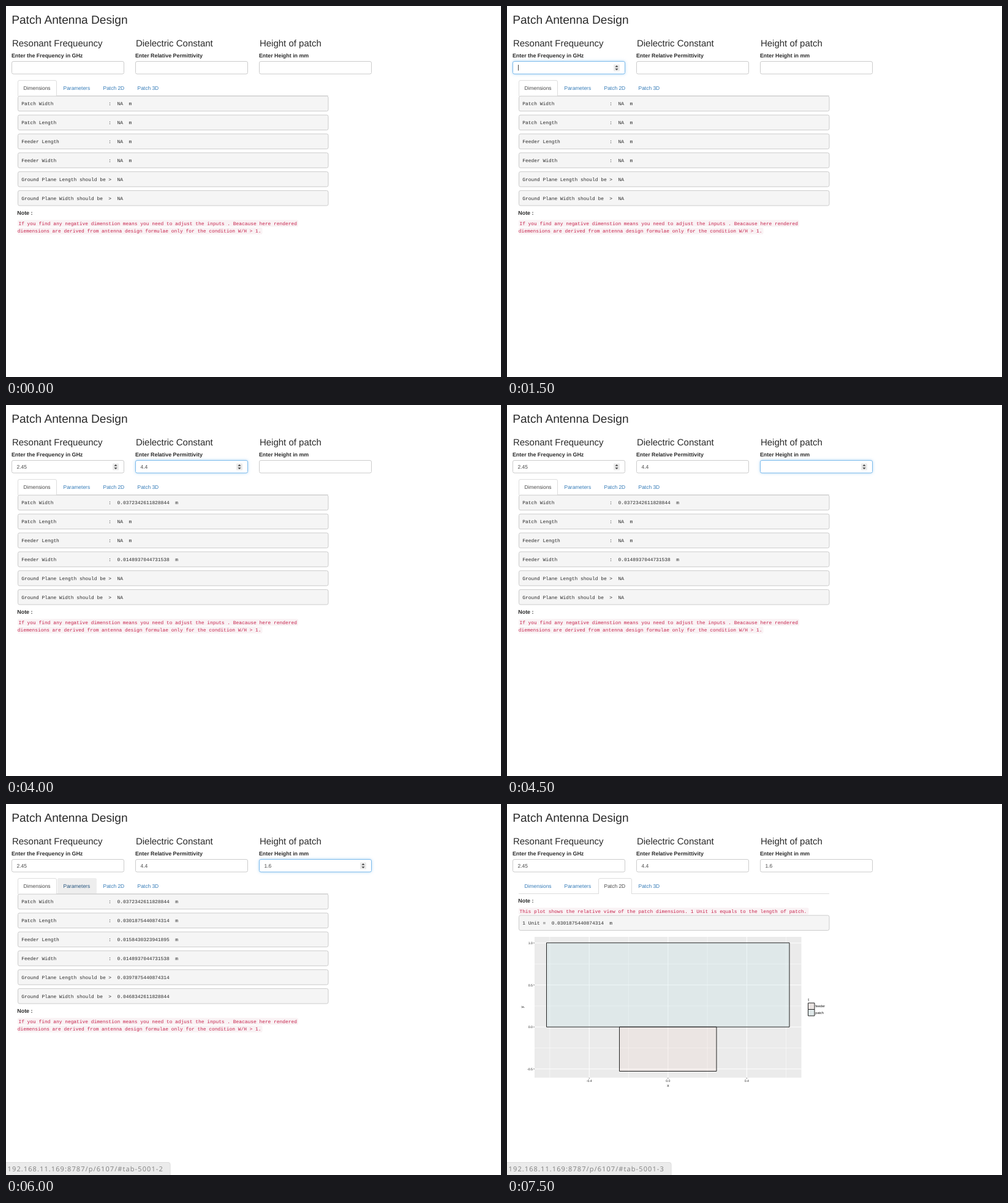
An HTML page with a canvas for the animation above (8 s loop, 808 by 606 pixels).

```html
<!DOCTYPE html>
<html lang="en">
<head>
<meta charset="utf-8">
<title>Patch Antenna Design</title>
<style>
html, body { margin: 0; width: 100%; height: 100%; overflow: hidden; background: #fff; }
canvas { display: block; }
</style>
</head>
<body>
<canvas id="stage" width="808" height="606"></canvas>
<script>
const ctx = document.getElementById('stage').getContext('2d');
const SANS = '"Liberation Sans", Arial, sans-serif';
const MONO = '7.9px "Liberation Mono", monospace';
const LABEL = `bold 8.9px ${SANS}`;
const STEP = 500, LOOP = 8000;

const FIELDS = [
  ['Resonant Frequeuncy', 'Enter the Frequency in GHz'],
  ['Dielectric Constant', 'Enter Relative Permittivity'],
  ['Height of patch', 'Enter Height in mm']
];
const TABS = [
  ['Dimensions', 19.5, 63], ['Parameters', 84.5, 63],
  ['Patch 2D', 149.5, 54], ['Patch 3D', 205.5, 53]
];
const LENGTH = '0.0301875440874314';

// Each entry changes part of the page state at its step.
const EVENTS = {
  0: { values: ['', '', ''], tab: 0, hover: -1, focus: -1, spin: -1, caret: false, link: 0, level: 0 },
  1: { link: 1 },
  2: { link: 0, spin: 0 },
  3: { focus: 0, caret: true },
  4: { values: ['2.', '', ''], caret: false },
  5: { values: ['2.45', '', ''] },
  6: { focus: 1 },
  7: { values: ['2.45', '4', ''] },
  8: { values: ['2.45', '4.4', ''], level: 1 },
  9: { focus: 2 },
  10: { values: ['2.45', '4.4', '1'] },
  11: { values: ['2.45', '4.4', '1.6'], level: 2, spin: -1 },
  12: { hover: 1, link: 2 },
  13: { focus: -1, tab: 1, hover: -1 },
  14: { hover: 2, link: 3 },
  15: { tab: 2, hover: -1 }
};

function stateAt(step) {
  const state = {};
  for (let i = 0; i <= step; i++) Object.assign(state, EVENTS[i]);
  return state;
}

function text(str, x, y, font, color = '#2b2b2b', align = 'left') {
  ctx.font = typeof font === 'number' ? `${font}px ${SANS}` : font;
  ctx.fillStyle = color;
  ctx.textAlign = align;
  ctx.fillText(str, x, y);
}

function box(x, y, w, h, radius, fill, stroke) {
  ctx.beginPath();
  ctx.roundRect(x, y, w, h, radius);
  if (fill) { ctx.fillStyle = fill; ctx.fill(); }
  if (stroke) { ctx.strokeStyle = stroke; ctx.lineWidth = 1; ctx.stroke(); }
}

function line(x1, y1, x2, y2, color, width = 1) {
  ctx.strokeStyle = color;
  ctx.lineWidth = width;
  ctx.beginPath();
  ctx.moveTo(x1, y1);
  ctx.lineTo(x2, y2);
  ctx.stroke();
}

function spinner(x) {
  box(x, 95.5, 10, 11, 1, '#ebebeb');
  ctx.fillStyle = '#444';
  for (const dir of [-1, 1]) {
    ctx.beginPath();
    ctx.moveTo(x + 2.4, 101 + dir * 1.2);
    ctx.lineTo(x + 7.6, 101 + dir * 1.2);
    ctx.lineTo(x + 5, 101 + dir * 4);
    ctx.fill();
  }
}

function glow(x, y, w, h) {
  ctx.save();
  ctx.shadowColor = 'rgba(102,175,233,.6)';
  ctx.shadowBlur = 5;
  box(x, y, w, h, 2.5, '#fff');
  ctx.restore();
}

function drawFields(s) {
  FIELDS.forEach(([title, label], i) => {
    const x = 9.5 + i * 202, focused = s.focus === i;
    text(title, x + 0.4, 66, 15);
    text(label, x - 0.6, 83.5, LABEL);
    if (focused) glow(x, 90.5, 183, 20.5);
    box(x, 90.5, 183, 20.5, 2.5, '#fff', focused ? '#7dbbec' : '#ccc');
    text(s.values[i], x + 8, 104, 8.5, '#4a4a4a');
    if (focused || s.spin === i) spinner(x + 164.5);
    if (focused && s.caret) line(x + 9, 96, x + 9, 105.5, '#444');
  });
}

function drawTabs(s) {
  line(19, 146.5, 526, 146.5, '#ddd');
  TABS.forEach(([name, x, w], i) => {
    const active = s.tab === i, hovered = s.hover === i;
    if (active) {
      box(x, 121.5, w, 26, [2.5, 2.5, 0, 0], '#fff', '#ddd');
      ctx.fillStyle = '#fff';
      ctx.fillRect(x - 1, 147, w + 2, 2);
    } else if (hovered) {
      box(x - 0.5, 121, w + 1, 25, [2.5, 2.5, 0, 0], '#eee');
    }
    text(name, x + 9, 136.5, 8.45, active ? '#4a4a4a' : hovered ? '#23527c' : '#337ab7');
  });
}

function pre(str, y) {
  box(19.5, y, 506.5, 24.5, 2.5, '#f5f5f5', '#ccc');
  text(str, 25.3, y + 15, MONO);
}

function rows(list) {
  list.forEach(([label, value, unit = '', sep = ':'], i) =>
    pre(`${label.padEnd(30)}${sep}  ${value}${unit}`, 147.2 + i * 30.87));
}

function code(str, x, y, right) {
  box(19, y - 8, right - 19, 11, 2, '#f9f2f4');
  text(str, x, y, MONO, '#c7254e');
}

function note(y) {
  text('Note :', 18.3, y, LABEL);
}

function drawDimensions({ level }) {
  const at = (need, value) => level >= need ? value : 'NA';
  rows([
    ['Patch Width', at(1, '0.0372342611828844'), '  m'],
    ['Patch Length', at(2, LENGTH), '  m'],
    ['Feeder Length', at(2, '0.0158430323941895'), '  m'],
    ['Feeder Width', at(1, '0.0148937044731538'), '  m'],
    ['Ground Plane Length should be', at(2, '0.0397875440874314'), '', '>'],
    ['Ground Plane Width should be', at(2, '0.0468342611828844'), '', '>']
  ]);
  note(341);
  code('If you find any negative dimenstion means you need to adjust the inputs . Beacause here rendered', 20.4, 357.5, 477);
  code('diemensions are derived from antenna design formulae only for the condition W/H > 1.', 18.8, 370, 418.5);
}

function drawParameters() {
  rows([
    ['Effective Length', '0.031686064788379', '  m'],
    ['Effective Dielectric Constant', '3.72831530819819'],
    ['Electrical Length', '46.6107608740283']
  ]);
}

function drawPlot() {
  const px = v => 262.8 + v * 321.5, py = v => 364.2 - v * 137.2;
  const tint = { patch: 'rgba(195,225,228,.3)', feeder: 'rgba(235,215,208,.3)' };
  note(161);
  code('This plot shows the relative view of the patch dimensions. 1 Unit is equals to the length of patch.', 20.4, 177.5, 492.5);
  pre(`1 Unit =  ${LENGTH}  m`, 181.9);

  ctx.fillStyle = '#ebebeb';
  ctx.fillRect(45, 217, 435.5, 230);
  for (let i = -3; i <= 3; i++) {
    const x = px(i * 0.2), major = i % 2 === 0;
    line(x, 217, x, 447, '#fff', major ? 1 : 0.5);
    if (!major) continue;
    line(x, 447, x, 449, '#555', 0.7);
    text((i * 0.2).toFixed(1), x, 453.8, 5.2, '#222', 'center');
  }
  for (let i = -2; i <= 4; i++) {
    const y = py(i * 0.25), major = i % 2 === 0;
    line(45, y, 480.5, y, '#fff', major ? 1 : 0.5);
    if (!major) continue;
    line(43, y, 45, y, '#555', 0.7);
    text((i * 0.25).toFixed(1), 42, y + 1.9, 5.2, '#222', 'right');
  }
  box(64.5, 226.8, 396.5, 137.4, 0, tint.patch, '#222');
  box(183.5, 364.2, 158.5, 72.3, 0, tint.feeder, '#222');

  text('x', 262.8, 462, 6.5, '#111', 'center');
  ctx.save();
  ctx.translate(27, 331.5);
  ctx.rotate(-Math.PI / 2);
  text('y', 0, 0, 6.5, '#111', 'center');
  ctx.restore();

  text('t', 491.3, 322, 6.5, '#111');
  ['feeder', 'patch'].forEach((name, i) => {
    const y = 325 + i * 10.5;
    box(491.5, y, 10.5, 10.5, 0, '#ebebeb');
    box(491.5, y, 10.5, 10.5, 0, tint[name], '#222');
    text(name, 503.3, y + 7.2, 5.6, '#111');
  });
}

function drawStatus({ link }) {
  if (!link) return;
  box(-2, 585.5, 270, 24, 3, '#ebebeb', '#dcdcdc');
  ctx.letterSpacing = '1.1px';
  text(`192.168.11.169:8787/p/6107/#tab-5001-${link}`, 2.6, 599.6, '11px "Open Sans", sans-serif', '#808080');
  ctx.letterSpacing = '0px';
}

const PANELS = [drawDimensions, drawParameters, drawPlot];

function frame(now) {
  const s = stateAt(Math.floor(now % LOOP / STEP));
  ctx.textRendering = 'geometricPrecision';
  ctx.fillStyle = '#fff';
  ctx.fillRect(0, 0, 808, 606);
  text('Patch Antenna Design', 9.2, 29, 19.15);
  drawFields(s);
  drawTabs(s);
  PANELS[s.tab](s);
  drawStatus(s);
  requestAnimationFrame(frame);
}
requestAnimationFrame(frame);
</script>
</body>
</html>
```
